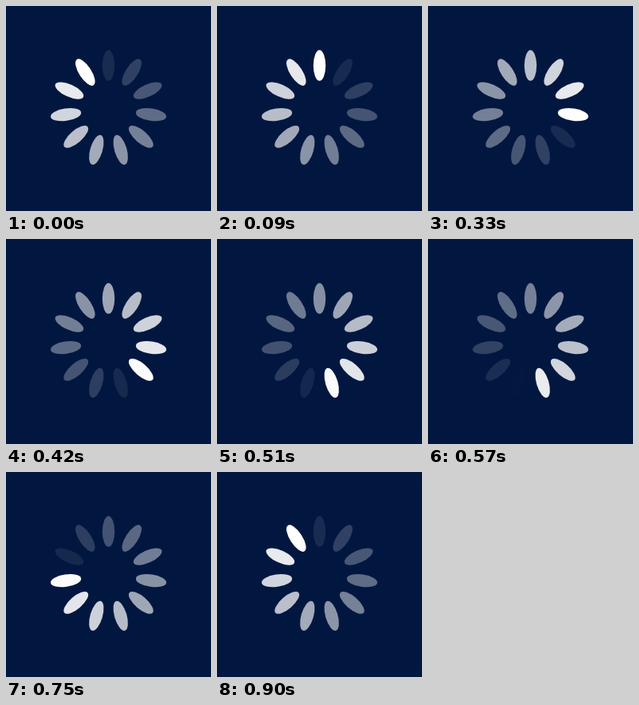
An HTML page that plays this animation: 257x257 px, repeating every 0.93 s.

```html
<!DOCTYPE html>
<html lang="en">
<head>
<meta charset="utf-8">
<title>Spinner</title>
<style>
  html, body { margin: 0; height: 100%; overflow: hidden; background: #021740; }
  svg { display: block; width: 100%; height: 100%; }
</style>
</head>
<body>
<svg viewBox="0 0 100 100" fill="#fff"></svg>
<script>
const PETALS = 11, LOOP = 930, TURN = 900, STEP = 30;
// Steps that repeat the pose of the step before
const held = new Set([2, 4, 7, 10, 12, 15, 18, 21, 23, 26, 29]);

const svg = document.querySelector('svg');
const petals = Array.from({ length: PETALS }, (_, i) => {
  const petal = document.createElementNS(svg.namespaceURI, 'ellipse');
  const attributes = { cx: 50, cy: 29, rx: 3, ry: 7.5, transform: `rotate(${i * 360 / PETALS} 50 50)` };
  for (const name in attributes) petal.setAttribute(name, attributes[name]);
  return svg.appendChild(petal);
});

function draw(now) {
  let step = Math.floor(now % LOOP / STEP);
  if (held.has(step)) step--;
  const turn = step * STEP / TURN;
  petals.forEach((petal, i) => {
    // Each petal flashes white, then fades out over one turn
    const age = (turn - (i + 1) / PETALS + 1 + 1e-9) % 1;
    petal.setAttribute('opacity', (1 - age).toFixed(3));
  });
}

const start = performance.now();
function tick() {
  draw(performance.now() - start);
  requestAnimationFrame(tick);
}
tick();
</script>
</body>
</html>
```
